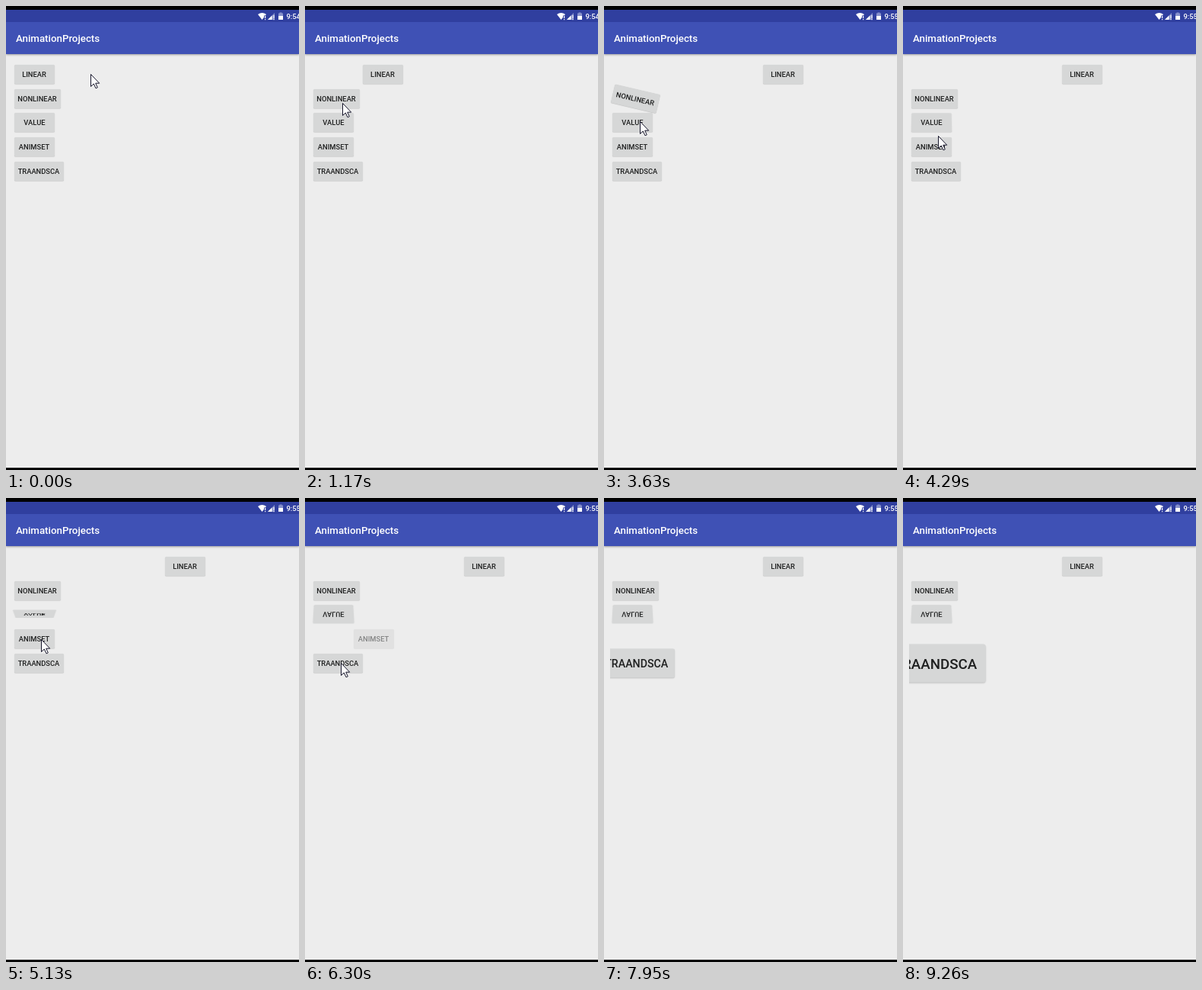
An HTML page for the animation above (9790 ms loop, 385 by 608 pixels).

```html
<!DOCTYPE html>
<html lang="en">
<head>
<meta charset="utf-8">
<title>AnimationProjects</title>
<style>
html, body { margin: 0; width: 100%; height: 100%; overflow: hidden; background: #ededed; }
#stage { position: absolute; left: 0; top: 0; width: 385px; height: 608px; overflow: hidden;
  background: #ededed; font: 500 9.35px Roboto, sans-serif; }
#stage > * { position: absolute; }
.edge { left: 0; width: 385px; background: #000; }
#status { left: 0; top: 5px; width: 385px; height: 16px; background: #303f9f; }
#bar { left: 0; top: 21px; width: 385px; height: 42px; background: #3f51b5; color: #fff;
  font-size: 13.3px; line-height: 43px; text-indent: 13px;
  box-shadow: 0 1px 2.5px rgba(0, 0, 0, .35); }
#clock { left: 368.5px; top: 5px; line-height: 17px; color: #fff; white-space: nowrap; }
#icons { left: 330px; top: 7px; }
#content { left: 8px; top: 63px; width: 377px; height: 542px; overflow: hidden; }
.btn { position: absolute; left: 2.5px; height: 25px; border-radius: 1.5px; background: #d6d7d7;
  color: #1e1f1f; line-height: 25px; text-align: center; white-space: nowrap;
  box-shadow: 0 .5px 1px rgba(0, 0, 0, .2); }
#cursor { left: 0; top: 0; overflow: visible; }
</style>
</head>
<body>
<div id="stage">
  <div id="content"></div>
  <div id="bar">AnimationProjects</div>
  <div id="status"></div>
  <svg id="icons" width="36" height="14">
    <path d="M1 4Q6.500 .2 12 4L6.500 11Z" fill="#fff"/>
    <path d="M10.500 5.500V11" stroke="#303f9f" stroke-width="3"/>
    <path d="M10.600 6V9M10.600 10V11.200" stroke="#fff" stroke-width="1.200"/>
    <path d="M14 11L23 2V11Z" fill="#8791cb"/>
    <path d="M14 11L19.500 5.500V11Z" fill="#fff"/>
    <path d="M22 5V9M22 10V11.200" stroke="#fff" stroke-width="1.100"/>
    <path d="M28 2.500H29.500V1.500H32.500V2.500H34V6H28Z" fill="#8791cb"/>
    <path d="M28 6H34V11H28Z" fill="#fff"/>
  </svg>
  <div id="clock">9:54</div>
  <div class="edge" style="top:0;height:5px"></div>
  <div class="edge" style="top:605px;height:3px"></div>
  <svg id="cursor" width="14" height="21">
    <path d="M.5 .5V16.500L4.300 13L7 18.800L9.300 17.800L6.700 12.200H11.700Z"
      fill="#fff" stroke="#15152a" stroke-linejoin="round"/>
  </svg>
</div>
<script>
const LOOP = 9790, RUN = 2000;
const $ = id => document.getElementById(id);

const buttons = [['LINEAR', 53], ['NONLINEAR', 61], ['VALUE', 53], ['ANIMSET', 53], ['TRAANDSCA', 65]]
  .map(([label, width], i) => {
    const el = document.createElement('div');
    el.className = 'btn';
    el.textContent = label;
    el.style.width = width + 'px';
    el.style.top = 14 + i * 31.65 + 'px';
    $('content').append(el);
    return el;
  });
const [linear, nonlinear, value, animset, scaler] = buttons;

// Screen refreshes: [first, last, count], aligned to 30 ms
const ticks = [0];
for (const [a, b, n] of [
  [120, 1050, 8], [1170, 2100, 8], [2250, 3210, 8], [3360, 4290, 8], [4410, 5130, 6],
  [5250, 5370, 2], [5520, 6420, 8], [6570, 7530, 8], [7680, 8520, 7]
]) for (let i = 0; i < n; i++) ticks.push(Math.round((a + (b - a) * i / (n - 1)) / 30) * 30);

// Pointer path: time, x, y
const path = [
  [0, 111, 89], [120, 102, 90], [390, 50, 92], [660, 50, 93], [1050, 50, 127], [1400, 47, 126],
  [1900, 48, 119], [2400, 48, 119], [3000, 47, 150], [4050, 47, 151], [4290, 46, 170],
  [4700, 46, 184], [5400, 46, 185], [5900, 47, 216], [6600, 47, 216], [7200, 66, 276],
  [7530, 136, 412], [7680, 194, 469]
];

const progress = (t, start) => Math.min(1, Math.max(0, (t - start) / RUN));
const ease = f => .5 - Math.cos(Math.PI * f) / 2;

function bounce(f) {
  const t = f * 1.1226, hop = (c, base) => 8 * (t - c) ** 2 + base;
  if (t < .3535) return hop(0, 0);
  if (t < .7408) return hop(.54719, .7);
  if (t < .9644) return hop(.8526, .9);
  return hop(1.0435, .95);
}

function pointer(t) {
  const i = path.findIndex(p => p[0] > t);
  if (i < 0) return path[path.length - 1].slice(1);
  const [t0, x0, y0] = path[i - 1], [t1, x1, y1] = path[i];
  const f = (t - t0) / (t1 - t0);
  return [x0 + (x1 - x0) * f, y0 + (y1 - y0) * f];
}

function draw(now) {
  const time = now % LOOP;
  const t = ticks.filter(k => k <= time).pop();

  linear.style.transform = `translateX(${198 * progress(t, 514)}px)`;
  const turn = progress(t, 2270);
  nonlinear.style.transform = `rotate(${turn < 1 ? 360 * (1 - bounce(turn)) : 0}deg)`;
  value.style.transform = `perspective(165px) rotateX(${200 * ease(progress(t, 4040))}deg)`;
  const slide = ease(progress(t, 5300));
  animset.style.transform = `translateX(${106 * slide}px)`;
  animset.style.opacity = 1 - slide;
  scaler.style.transform = `scale(${1 + progress(t, 6510) ** 2})`;

  $('clock').textContent = t < 2700 ? '9:54' : '9:55';
  const [x, y] = pointer(t);
  $('cursor').style.transform = `translate(${Math.round(x)}px, ${Math.round(y)}px)`;
  $('cursor').style.visibility = t > 7680 ? 'hidden' : 'visible';
}

const begin = performance.now();
function loop() {
  draw(performance.now() - begin);
  requestAnimationFrame(loop);
}
loop();
</script>
</body>
</html>
```
